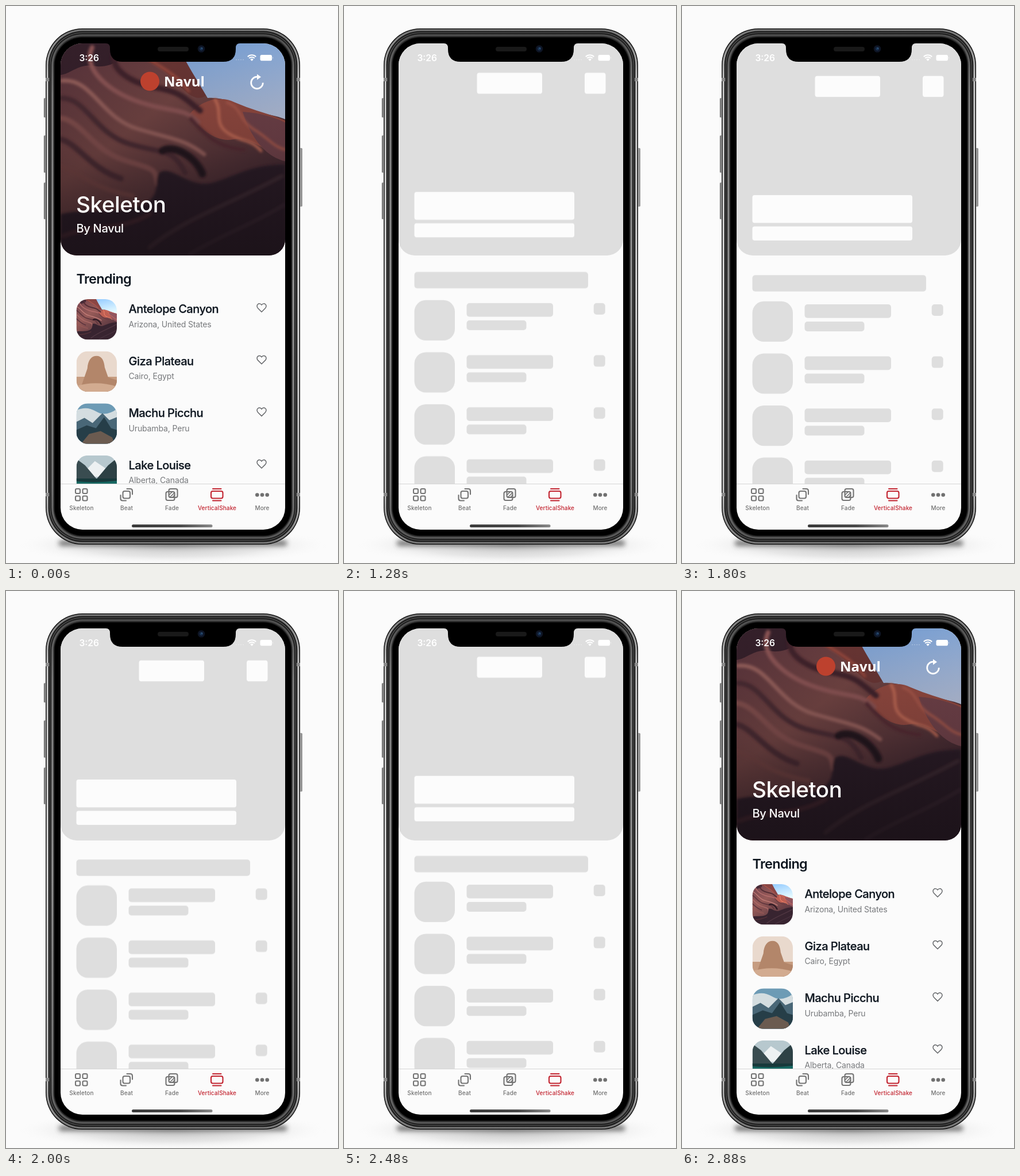
These frames come from a looping animation (578 by 969 pixels, 6 s). An HTML page:

```html
<!DOCTYPE html>
<html lang="en">
<head>
<meta charset="utf-8">
<title>Skeleton loading</title>
<style>
  html, body { margin: 0; width: 100%; height: 100%; overflow: hidden; background: #fbfbfb; }
  svg { display: block; }
  #stage { width: 100vw; height: 100vh; }
  text { font-family: Inter, Roboto, "Liberation Sans", sans-serif; }

  .content { animation: content 6s step-end infinite; }
  .bones { animation: bones 6s step-end infinite; }
  .shake-head { animation: head 6s infinite; }
  .shake-list { animation: list 6s infinite; }

  @keyframes content {
    0%, 48% { visibility: visible; }
    16.6667% { visibility: hidden; }
  }
  @keyframes bones {
    0%, 48% { visibility: hidden; }
    16.6667% { visibility: visible; }
  }
  @keyframes head {
    0% { transform: translateY(0); }
    16.6667% { transform: translateY(0); animation-timing-function: cubic-bezier(.65, 0, .35, 1); }
    29.3333% { transform: translateY(6.9px); animation-timing-function: cubic-bezier(.65, 0, .35, 1); }
    41.6667% { transform: translateY(-.4px); animation-timing-function: ease-in; }
    48%, 100% { transform: translateY(2.1px); }
  }
  @keyframes list {
    0% { transform: translateY(0); }
    16.6667% { transform: translateY(0); animation-timing-function: cubic-bezier(.65, 0, .35, 1); }
    28.1667% { transform: translateY(3.1px); animation-timing-function: cubic-bezier(.65, 0, .35, 1); }
    42% { transform: translateY(-5.1px); animation-timing-function: ease-in; }
    48%, 100% { transform: translateY(-2.5px); }
  }

  .title { font-size: 38.5px; font-weight: 500; letter-spacing: -.4px; }
  .by { font-size: 20px; font-weight: 500; letter-spacing: -.3px; }
  .brand { font: 700 24px "Open Sans", "Noto Sans", sans-serif; }
  .heading { font-size: 23.5px; font-weight: 600; letter-spacing: -.7px; fill: #0f1720; }
  .name { font-size: 20px; font-weight: 500; letter-spacing: -.5px; fill: #0f1720; stroke: #0f1720; stroke-width: .25; }
  .place { font-size: 14px; letter-spacing: -.14px; fill: #77797c; }
  .tabs text { font-size: 10px; font-weight: 500; letter-spacing: .1px; text-anchor: middle; fill: #707070; }
  .tabs .on { fill: #c2232f; }
  .icon { fill: none; stroke: #747474; stroke-width: 2.1; stroke-linecap: round; }
  .streaks path { fill: none; stroke-linecap: round; }
</style>
</head>
<body>
<svg id="stage" viewBox="0 0 578 969" preserveAspectRatio="none">
  <defs>
    <linearGradient id="rim" x2="0" y2="1">
      <stop offset="0" stop-color="#777"/><stop offset=".1" stop-color="#c9c9c9"/>
      <stop offset=".5" stop-color="#dedede"/><stop offset=".9" stop-color="#c2c2c2"/><stop offset="1" stop-color="#777"/>
    </linearGradient>
    <linearGradient id="band" x2="0" y2="1">
      <stop offset="0" stop-color="#4c4c4c"/><stop offset=".12" stop-color="#777"/>
      <stop offset=".5" stop-color="#8d8d8d"/><stop offset=".9" stop-color="#707070"/><stop offset="1" stop-color="#565656"/>
    </linearGradient>
    <linearGradient id="button">
      <stop offset="0" stop-color="#222"/><stop offset=".5" stop-color="#ccc"/><stop offset="1" stop-color="#444"/>
    </linearGradient>
    <linearGradient id="home">
      <stop offset="0" stop-color="#3a3a3a"/><stop offset=".6" stop-color="#4a4a4a"/><stop offset="1" stop-color="#8a8a8a"/>
    </linearGradient>
    <linearGradient id="sky" x2=".3" y2="1">
      <stop offset="0" stop-color="#709bd3"/><stop offset="1" stop-color="#b9c5de"/>
    </linearGradient>
    <linearGradient id="wall" x2=".8" y2="1">
      <stop offset="0" stop-color="#55313a"/><stop offset=".4" stop-color="#744644"/><stop offset="1" stop-color="#33202a"/>
    </linearGradient>
    <linearGradient id="shade" x2="0" y2="1">
      <stop offset="0" stop-color="#100a10" stop-opacity=".02"/><stop offset=".5" stop-color="#100a10" stop-opacity=".18"/>
      <stop offset="1" stop-color="#140d12" stop-opacity=".62"/>
    </linearGradient>
    <radialGradient id="shadow">
      <stop offset="0" stop-color="#777" stop-opacity=".5"/><stop offset=".6" stop-color="#aaa" stop-opacity=".25"/>
      <stop offset="1" stop-color="#fbfbfb" stop-opacity="0"/>
    </radialGradient>
    <filter id="soft"><feGaussianBlur stdDeviation="2.2"/></filter>
    <filter id="haze" x="-10%" y="-200%" width="120%" height="500%"><feGaussianBlur stdDeviation="4"/></filter>
    <clipPath id="screen"><rect x="95" y="65" width="391" height="846" rx="38"/></clipPath>
    <clipPath id="page"><rect x="95" y="65" width="391" height="766"/></clipPath>
    <clipPath id="heroBox"><path d="M95 65H486V406a28 28 0 0 1-28 28H123a28 28 0 0 1-28-28Z"/></clipPath>
    <clipPath id="thumb"><rect width="70.5" height="70.5" rx="20"/></clipPath>

    <symbol id="canyon" viewBox="95 65 391 369" preserveAspectRatio="xMaxYMid slice">
      <path d="M270 65H486V230H330Z" fill="url(#sky)"/>
      <path d="M95 65H297C310 95 330 124 351 160C375 158 400 168 430 181C455 190 470 190 486 197V434H95Z" fill="url(#wall)"/>
      <path d="M95 65H205C215 92 180 110 150 104C128 100 112 118 95 120Z" fill="#35202a"/>
      <path d="M190 65H297C312 96 328 122 348 156C330 168 312 150 292 128C262 96 226 92 190 65Z" fill="#6a3634"/>
      <path d="M318 190C338 166 366 156 392 165C430 182 455 186 486 199V262C455 258 425 225 396 232C368 238 340 216 318 190Z" fill="#934a40"/>
      <path d="M412 184C440 186 465 192 486 203V270C450 262 425 226 412 184Z" fill="#704249"/>
      <g class="streaks" filter="url(#soft)">
        <path d="M98 130C150 125 165 195 230 214S310 232 345 258" stroke="#96605c" stroke-width="7"/>
        <path d="M96 160C140 160 155 222 215 240S290 246 312 290" stroke="#4a2a30" stroke-width="9"/>
        <path d="M96 195C132 200 150 250 205 268S258 280 264 310" stroke="#83504e" stroke-width="9"/>
        <path d="M96 232C125 240 150 285 200 300" stroke="#492a31" stroke-width="10"/>
        <path d="M97 280C130 290 150 318 220 330" stroke="#744443" stroke-width="8"/>
        <path d="M150 72C132 110 180 150 235 168S310 176 334 202" stroke="#8c5554" stroke-width="8"/>
        <path d="M190 80C178 110 218 134 262 142S310 160 338 182" stroke="#412329" stroke-width="10"/>
        <path d="M225 75C252 100 290 110 318 148" stroke="#994a3e" stroke-width="5"/>
        <path d="M364 163C378 184 360 205 388 222S424 230 444 252" stroke="#c16a54" stroke-width="5"/>
        <path d="M385 168C412 178 404 198 432 215S464 244 486 250" stroke="#ac5a4c" stroke-width="4"/>
        <path d="M322 196C345 222 365 245 414 250" stroke="#532c30" stroke-width="7"/>
        <path d="M272 252C292 240 330 262 342 292" stroke="#24151c" stroke-width="13"/>
        <path d="M486 276C425 275 400 297 357 308C316 317 284 272 265 292C258 310 270 330 238 346C196 364 150 350 95 362V434H486Z" fill="#2b1c25" stroke="none" style="fill:#2b1c25"/>
        <path d="M250 420C310 370 390 345 480 296" stroke="#3e2a33" stroke-width="7"/>
        <path d="M320 432C370 400 430 380 484 346" stroke="#392731" stroke-width="6"/>
        <path d="M100 400C150 380 200 392 250 362" stroke="#45282d" stroke-width="7"/>
      </g>
    </symbol>

    <symbol id="desert" viewBox="0 0 70 70">
      <path d="M0 0H70V70H0Z" fill="#e9d9cd"/>
      <path d="M0 44H70V70H0Z" fill="#c69c80"/>
      <path d="M10 56L19 30C20 15 26 8 35 8C44 8 48 16 49 28L55 45L70 50V70H4Z" fill="#b3866a"/>
      <path d="M0 60Q35 50 70 61V70H0Z" fill="#d2ab90"/>
    </symbol>
    <symbol id="peaks" viewBox="0 0 70 70">
      <path d="M0 0H70V70H0Z" fill="#6d9bb5"/>
      <path d="M0 12Q18 4 34 14T70 10V38H0Z" fill="#d4dde0"/>
      <path d="M0 32L14 25L28 34L45 17L57 29L70 24V70H0Z" fill="#496777"/>
      <path d="M0 46L18 38L34 43L48 24L60 43L70 46V70H0Z" fill="#263e48"/>
      <path d="M8 70L22 53L42 48L62 59L66 70Z" fill="#6b5b50"/>
    </symbol>
    <symbol id="lake" viewBox="0 0 70 70">
      <path d="M0 0H70V70H0Z" fill="#b7c8ce"/>
      <path d="M18 24L32 10L50 22L44 37H26Z" fill="#edf1f2"/>
      <path d="M0 6L15 17L36 42H0Z" fill="#394c50"/>
      <path d="M70 5L55 17L34 42H70Z" fill="#2d4145"/>
      <path d="M0 40H70V70H0Z" fill="#176862"/>
      <path d="M0 40H70V44Q35 48 0 45Z" fill="#18393b"/>
    </symbol>
  </defs>

  <rect width="578" height="969" fill="#fbfbfb"/>
  <ellipse cx="290" cy="938" rx="275" ry="34" fill="url(#shadow)"/>
  <rect x="92" y="930" width="397" height="9" rx="4" fill="#444" opacity=".75" filter="url(#haze)"/>

  <g fill="url(#button)">
    <rect x="66" y="160" width="5" height="34" rx="1.5"/>
    <rect x="66" y="225" width="5" height="65" rx="1.5"/>
    <rect x="66" y="307" width="5" height="64" rx="1.5"/>
    <rect x="510.500" y="247" width="5" height="102" rx="1.5"/>
  </g>
  <g id="body"></g>
  <g fill="#8b8b8b">
    <path d="M69 125h6v6h-6zM506 125h6v6h-6zM69 847h6v6h-6zM506 847h6v6h-6z"/>
  </g>

  <g clip-path="url(#screen)">
    <rect x="95" y="65" width="391" height="846" fill="#fbfbfb"/>
    <g clip-path="url(#page)">
      <g class="content">
        <g clip-path="url(#heroBox)">
          <use href="#canyon" x="95" y="65" width="391" height="369"/>
          <rect x="95" y="65" width="391" height="369" fill="url(#shade)"/>
        </g>
        <circle cx="250.500" cy="131" r="16.500" fill="#bd412e"/>
        <g fill="#fff">
          <text class="brand" x="275" y="140">Navul</text>
          <text class="title" x="122" y="359">Skeleton</text>
          <text class="by" x="122.500" y="394">By Navul</text>
          <path d="M437 118.500l7 5-7 5z"/>
        </g>
        <path d="M447.300 133.500A10.300 10.300 0 1 1 437 123.200" fill="none" stroke="#fff" stroke-width="2.700"/>
        <text class="heading" x="122.500" y="483">Trending</text>
        <g id="rows"></g>
      </g>

      <g class="bones">
        <path d="M95 65H486V406a28 28 0 0 1-28 28H123a28 28 0 0 1-28-28Z" fill="#dedede"/>
        <g class="shake-head">
          <g fill="#fcfcfc">
            <rect x="231.500" y="114.700" width="113.500" height="36.500" rx="4"/>
            <rect x="419" y="114.700" width="36.500" height="36.500" rx="4"/>
            <rect x="122.500" y="322" width="278.500" height="48.500" rx="4"/>
            <rect x="122.500" y="376.500" width="278.500" height="24.500" rx="4"/>
          </g>
          <rect x="122.500" y="461.300" width="302.500" height="28.500" rx="5" fill="#dedede"/>
        </g>
        <g id="blocks" class="shake-list" fill="#dedede"></g>
      </g>
    </g>

    <g fill="#fff">
      <text x="127.500" y="96" font-size="15.500" font-weight="600">3:26</text>
      <path d="M428 95.800l-2.700-2.900a3.900 3.900 0 0 1 5.400 0z"/>
      <rect x="442.500" y="85" width="20.500" height="10.200" rx="2.800"/>
      <path d="M464.300 88.500q1.600 1.500 0 3.400z"/>
      <g opacity=".45"><circle cx="401" cy="93.500" r=".8"/><circle cx="405" cy="93.500" r=".8"/><circle cx="409" cy="93.500" r=".8"/><circle cx="413" cy="93.500" r=".8"/></g>
    </g>
    <path d="M420.800 88.300a10.300 10.300 0 0 1 14.400 0M423.200 90.900a6.900 6.900 0 0 1 9.600 0" fill="none" stroke="#fff" stroke-width="2"/>

    <path d="M95 831.500H486" stroke="#d6d6d6"/>
    <g class="tabs">
      <g class="icon">
        <rect x="121" y="840" width="8" height="8" rx="2"/><rect x="133.500" y="840" width="8" height="8" rx="2"/>
        <rect x="121" y="852.500" width="8" height="8" rx="2"/><rect x="133.500" y="852.500" width="8" height="8" rx="2"/>
        <rect x="203.500" y="844" width="12.500" height="12.500" rx="3"/>
        <path d="M210.500 840h6q3.500 0 3.500 3.500v6M209 860.500h-6q-3.500 0-3.500-3.500v-6"/>
        <rect x="283.500" y="840" width="15" height="15" rx="3"/>
        <rect x="278.500" y="845" width="15" height="15" rx="3"/>
        <path d="M284.500 850l5-5M285.500 854.500l8-8M289.500 855l4-4" stroke-width="1.700"/>
        <g stroke="#c2232f"><rect x="357" y="844" width="20.500" height="12.500" rx="3"/><path d="M360 840h14.500M360 860.500h14.500"/></g>
      </g>
      <g fill="#707070"><circle cx="437.300" cy="850.500" r="3.300"/><circle cx="446" cy="850.500" r="3.300"/><circle cx="454.700" cy="850.500" r="3.300"/></g>
      <text x="131.500" y="877">Skeleton</text>
      <text x="210" y="877">Beat</text>
      <text x="289" y="877">Fade</text>
      <text x="367.500" y="877" class="on">VerticalShake</text>
      <text x="446" y="877">More</text>
    </g>
    <rect x="219" y="902" width="140.500" height="5" rx="2.500" fill="url(#home)"/>
  </g>

  <path d="M174 64H407V65Q400 65 400 73V75Q400 97 378 97H203Q181 97 181 75V73Q181 65 174 65Z" fill="#000"/>
  <rect x="264" y="71" width="54" height="8" rx="4" fill="#191919"/>
  <circle cx="340" cy="74.500" r="6.300" fill="#0e1525"/>
  <circle cx="340" cy="74.500" r="3" fill="#18304f"/>
  <circle cx="341" cy="73.500" r="1" fill="#3c6790"/>
</svg>
<script>
  const byId = id => document.getElementById(id);
  const pitch = 90.6;

  // Nested shells of the phone: inset and fill
  const shells = [
    [0, '#141414'], [1.6, 'url(#rim)'], [4.6, '#1c1c1c'], [6.8, '#4a4a4a'],
    [8.6, '#101010'], [10, 'url(#band)'], [13.5, '#262626'], [15.5, '#000']
  ];
  byId('body').innerHTML = shells.map(([d, fill]) =>
    `<rect x="${69 + d}" y="${39 + d}" width="${443 - 2 * d}" height="${898 - 2 * d}" rx="${64 - d}" fill="${fill}"/>`
  ).join('');

  const places = [
    ['Antelope Canyon', 'Arizona, United States', 'canyon'],
    ['Giza Plateau', 'Cairo, Egypt', 'desert'],
    ['Machu Picchu', 'Urubamba, Peru', 'peaks'],
    ['Lake Louise', 'Alberta, Canada', 'lake']
  ];
  const heart = 'M445 532.2L438.6 525.8C433.8 520.4 441.2 514.4 445 520.2C448.800 514.400 456.200 520.400 451.400 525.800Z';

  byId('rows').innerHTML = places.map(([name, place, pic], i) => `
    <g transform="translate(0 ${i * pitch})">
      <g transform="translate(122.5 510)" clip-path="url(#thumb)">
        <use href="#${pic}" width="70.5" height="70.5" ${pic === 'canyon' ? 'style="filter:brightness(1.3)"' : ''}/>
      </g>
      <text class="name" x="213.500" y="534">${name}</text>
      <text class="place" x="213.500" y="558.500">${place}</text>
      <path d="${heart}" fill="none" stroke="#66686b" stroke-width="1.500" stroke-linejoin="round"/>
    </g>`).join('');

  byId('blocks').innerHTML = places.map((_, i) => `
    <g transform="translate(0 ${i * pitch})">
      <rect x="122.500" y="510.800" width="70.500" height="70.200" rx="20"/>
      <rect x="213.500" y="516" width="150.500" height="23.700" rx="5"/>
      <rect x="213.500" y="546" width="104" height="17" rx="5"/>
      <rect x="434.700" y="516" width="20" height="20" rx="5"/>
    </g>`).join('');
</script>
</body>
</html>
```
